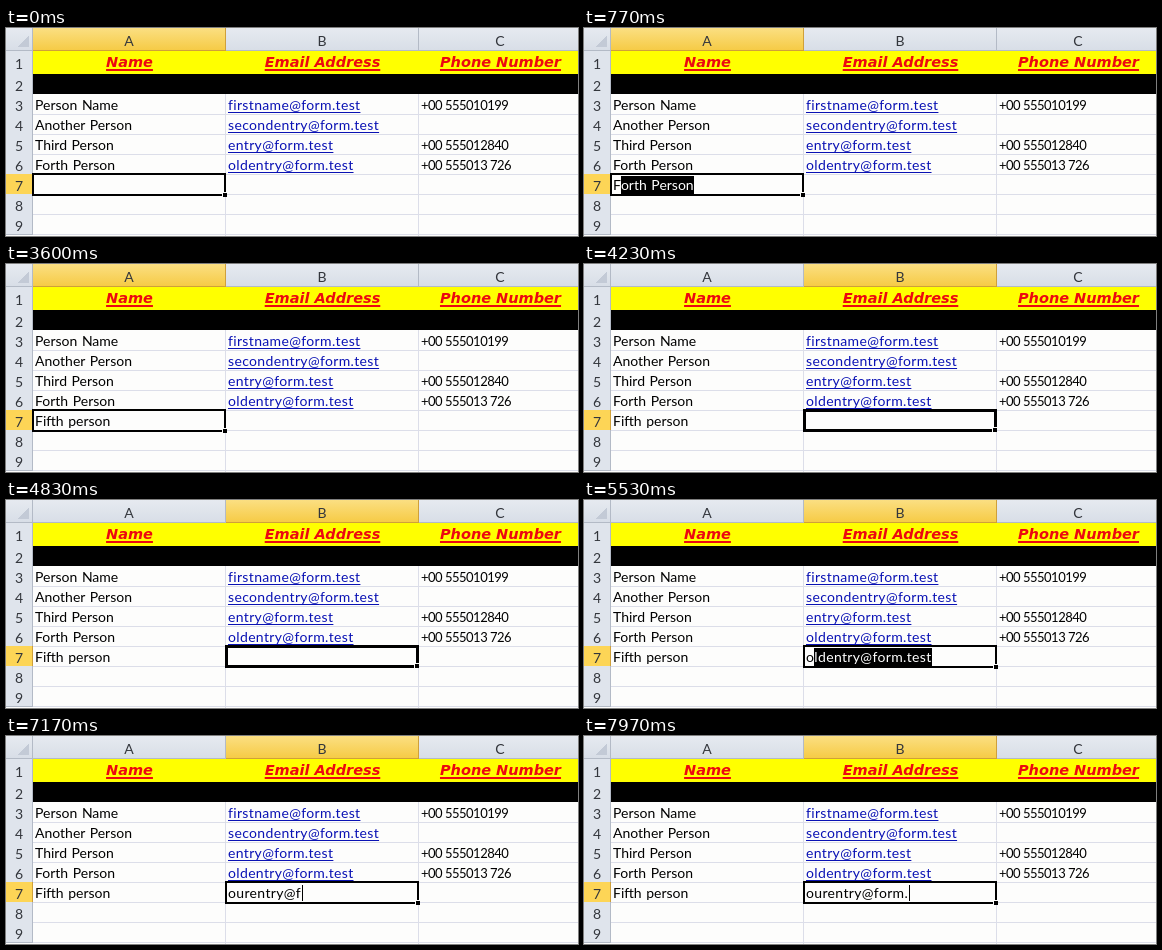
An HTML page for the animation above (8 s loop, 572 px wide and 208 px high).

```html
<!DOCTYPE html>
<html lang="en">
<head>
<meta charset="utf-8">
<title>Spreadsheet entry</title>
<style>
  html, body { margin: 0; width: 100%; height: 100%; overflow: hidden; background: #fdfdfc; }
  #sheet {
    position: relative; width: 572px; height: 208px; overflow: hidden;
    background: #fdfdfc; color: #000; font: 14px/20px Lato, "Open Sans", sans-serif;
  }
  #sheet > div { position: absolute; box-sizing: border-box; white-space: pre; }
  .head {
    background: linear-gradient(#e6eaf0, #d8dee7); color: #33363c; text-align: center;
    border: solid #b3bac6; border-width: 0 1px 1px 0;
  }
  .head.on { background: linear-gradient(#fbdf82, #f6cb46); border-color: #cfa03a; }
  .head.row { background: #dfe4ec; }
  .head.row.on { background: #fdd556; }
  .corner::after {
    content: ""; position: absolute; right: 3px; bottom: 3px; width: 11px; height: 11px;
    background: linear-gradient(135deg, transparent 50%, #c3cad6 50%);
  }
  .line { background: #dcdee9; }
  .title {
    color: #ec0810; text-align: center; font: italic 700 14.5px/22px "DejaVu Sans", sans-serif;
    text-decoration: underline 2px; text-underline-offset: 2px; text-decoration-skip-ink: none;
  }
  .name { word-spacing: 1px; }
  .mail { letter-spacing: .35px; }
  .link { color: #0a12b4; text-decoration: underline 1px; text-underline-offset: 2px; text-decoration-skip-ink: none; }
  .phone { font-size: 13px; letter-spacing: -.5px; }
  #box { border: 2px solid #000; }
  #box.thick { border-width: 3px; }
  #box::after {
    content: ""; position: absolute; right: -3px; bottom: -3px;
    width: 4px; height: 4px; background: #000; border: solid #fdfdfc; border-width: 1px 0 0 1px;
  }
  #hint { background: #000; color: #fff; display: inline-block; height: 18px; line-height: 18px; }
  #caret { display: inline-block; width: 1px; height: 16px; margin-left: 1px; background: #000; vertical-align: -3px; }
</style>
</head>
<body>
<div id="sheet"></div>
<script>
const LOOP = 8000, MOVE = 3950, BLINK = 530;
const sheet = document.getElementById("sheet");
const cols = [[27, 193], [220, 193], [413, 163]];
const rowTop = n => n === 1 ? 23 : 46 + (n - 2) * 20;

function add(cls, x, y, w, h, text = "") {
  const el = document.createElement("div");
  el.className = cls;
  el.style.cssText = `left:${x}px;top:${y}px;width:${w}px;height:${h}px`;
  el.textContent = text;
  sheet.append(el);
  return el;
}

// Grid, fills and headings
for (let n = 3; n <= 9; n++) add("line", 27, rowTop(n) + 20, 545, 1);
for (const x of [219, 412]) add("line", x, 66, 1, 142);
add("", 27, 23, 545, 23).style.background = "#ffff00";
add("", 27, 46, 545, 20).style.background = "#000";

add("head corner", 0, 0, 27, 23);
const colHeads = cols.map(([x, w], i) => {
  const el = add("head", x, 0, w, 23, "ABC"[i]);
  el.style.lineHeight = "25px";
  return el;
});
for (let n = 1; n <= 9; n++) {
  const h = n === 1 ? 24 : 21;
  const el = add(n === 7 ? "head row on" : "head row", 0, rowTop(n), 27, h, n);
  el.style.lineHeight = h + 2 + "px";
}
["Name", "Email Address", "Phone Number"].forEach((t, i) =>
  add("title", cols[i][0], 23, cols[i][1], 22, t));

// Filled rows
const people = [
  ["Person Name", "firstname@form.test", "+00 555010199"],
  ["Another Person", "secondentry@form.test", ""],
  ["Third Person", "entry@form.test", "+00 555012840"],
  ["Forth Person", "oldentry@form.test", "+00 555013 726"]
];
const kinds = ["name", "mail link", "phone"];
people.forEach((row, r) => row.forEach((text, c) =>
  add(kinds[c], cols[c][0] + 2, rowTop(r + 3) + 1, 185, 20, text)));

// Typed cells: one time per key; the first key brings up a suggestion
const entries = [
  { text: "Fifth person", hint: "orth Person",
    keys: [500, 1000, 1250, 1500, 1700, 1900, 2120, 2210, 2310, 2400, 2490, 2620] },
  { text: "ourentry@form.", hint: "ldentry@form.test",
    keys: [5500, 5640, 5780, 5920, 6060, 6180, 6300, 6440, 6900, 7150, 7300, 7450, 7600, 7750] }
];
const cells = entries.map((e, c) =>
  add(["name", "mail"][c], cols[c][0] + 2, rowTop(7) + 1, 185, 20));
const box = add("", 0, 145, 0, 23);
box.id = "box";

const hint = document.createElement("span");
hint.id = "hint";
const caret = document.createElement("span");
caret.id = "caret";

let shown = "";
function draw(now) {
  const t = now % LOOP;
  const active = t < MOVE ? 0 : 1;
  const counts = entries.map(e => e.keys.filter(k => k <= t).length);
  const count = counts[active];
  const since = t - entries[active].keys[count - 1];
  const caretOn = count > 1 && Math.floor(since / BLINK) % 2 === 0;
  const state = [active, ...counts, caretOn].join();

  if (state !== shown) {
    shown = state;
    colHeads.forEach((el, i) => el.classList.toggle("on", i === active));
    box.style.left = cols[active][0] - 1 + "px";
    box.style.width = cols[active][1] + 1 + "px";
    box.classList.toggle("thick", active === 1 && count === 0);
    cells.forEach((el, i) => { el.textContent = entries[i].text.slice(0, counts[i]); });
    if (count === 1) {
      hint.textContent = entries[active].hint;
      cells[active].append(hint);
    } else if (caretOn) {
      cells[active].append(caret);
    }
  }
  requestAnimationFrame(() => draw(performance.now()));
}
draw(performance.now());
</script>
</body>
</html>
```
